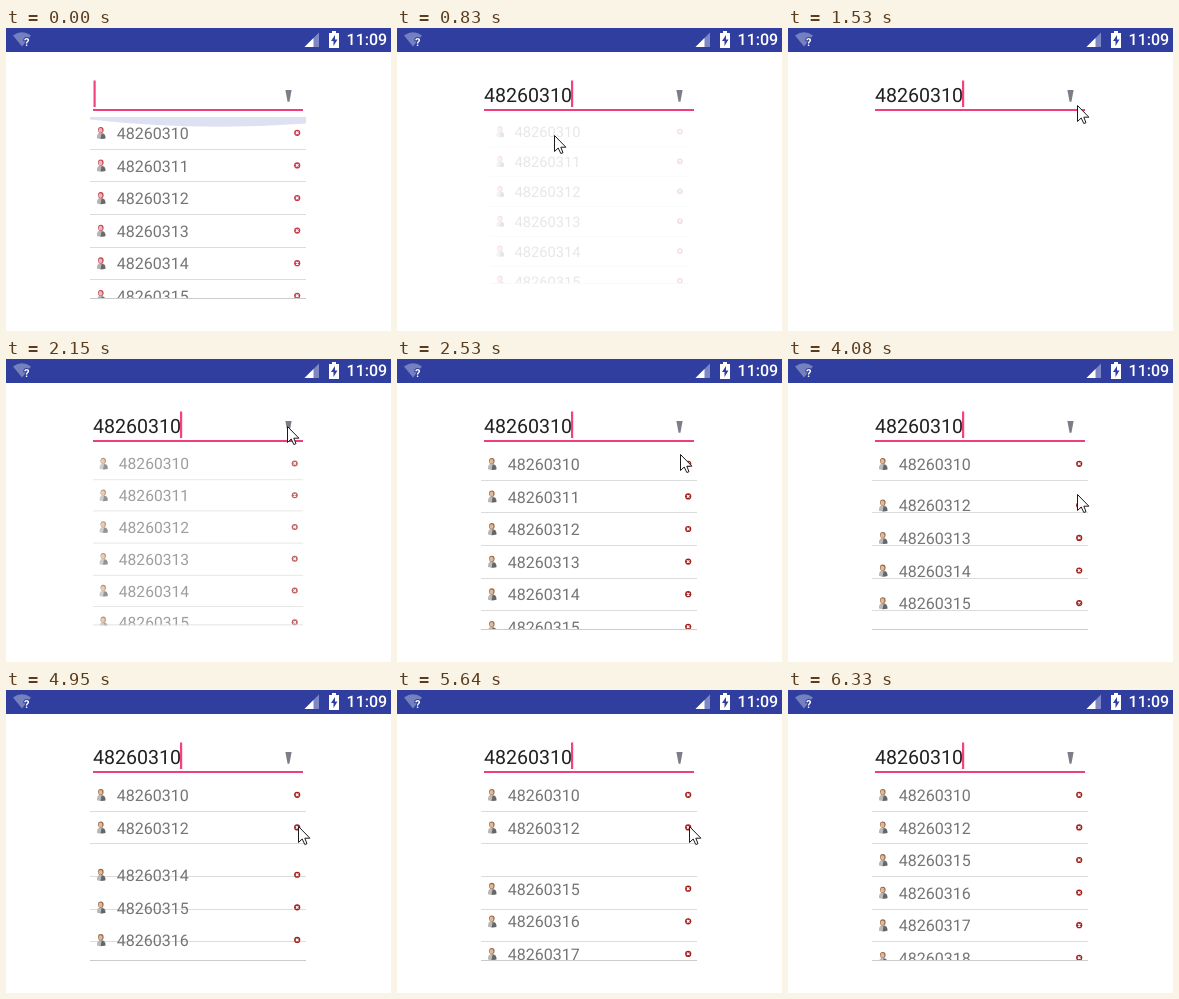
An HTML page for the animation above (6960 ms loop, 385 by 303 pixels).

```html
<!DOCTYPE html>
<html lang="en">
<head>
<meta charset="utf-8">
<title>Account dropdown</title>
<style>
  html, body { margin: 0; width: 100%; height: 100%; overflow: hidden; background: #fff; }
  svg { display: block; width: 385px; height: 303px; }
  text { font-family: Roboto, "Noto Sans", sans-serif; text-rendering: geometricPrecision; }
  #popup { --head: #e3b892; --hair: #93684a; --body: #b9b9b9; --shade: #666; --remove: #a3201c; }
  #popup.rosy { --head: #ecb4b9; --hair: #c2404e; --body: #b4b4b4; --shade: #696969; --remove: #c73a4c; }
  .row text { font-size: 16px; fill: #757575; }
</style>
</head>
<body>
<svg viewBox="0 0 385 303">
  <defs>
    <g id="person">
      <path d="M91 110.3Q90.6 106 93.6 104.8H96.6Q99.8 106 99.4 110.3Q95.5 111.6 91 110.3Z" fill="var(--body)"/>
      <path d="M95.6 105.4L98.4 106.4Q99.6 108 99.4 110.4L94.6 111Z" fill="var(--shade)"/>
      <ellipse cx="94.8" cy="102" rx="2.8" ry="3.1" fill="var(--hair)"/>
      <ellipse cx="94.5" cy="102.4" rx="2" ry="2.4" fill="var(--head)"/>
    </g>
    <g id="remove">
      <circle cx="291.2" cy="104.8" r="3.1" fill="var(--remove)"/>
      <path d="M289.9 103.5l2.6 2.6m0-2.6l-2.6 2.6" stroke="#fff" stroke-width="1.2"/>
    </g>
    <clipPath id="listClip"><rect x="84" y="89" width="216" height="182"/></clipPath>
  </defs>

  <rect width="385" height="303" fill="#fff"/>
  <rect width="385" height="24" fill="#303f9f"/>
  <g id="status">
    <path d="M7 7.5Q16 .8 25 7.5L16 18.5Z" fill="#7580bf"/>
    <text x="18" y="17.5" font-size="11" font-weight="700" fill="#fff" stroke="#303f9f" stroke-width="2" paint-order="stroke">?</text>
    <path d="M298.5 19L313 4.5V19Z" fill="#7d87c3"/>
    <path d="M298.5 19L307.5 10V19Z" fill="#fff"/>
    <path d="M326 3h4v2h3v15h-10V5h3Z" fill="#fff"/>
    <path d="M329 7l-4 6h2.5v5l4-6.5h-2.5Z" fill="#303f9f"/>
    <text x="340.6" y="17.3" font-size="16" font-weight="500" fill="#fff">11:09</text>
  </g>

  <text id="field" x="87" y="74" font-size="19.6" fill="#212121"></text>
  <rect id="caret" y="52.5" width="2.2" height="26.5" fill="#f0437f"/>
  <rect x="87" y="81" width="210" height="2" fill="#ee3f7c"/>
  <path d="M279.4 62H285.6L283.4 73.8H281.6Z" fill="#7d7d87"/>

  <g id="popup">
    <g clip-path="url(#listClip)">
      <g id="dividers" fill="#dcdcdc"></g>
      <g id="rows"></g>
      <path id="glow" d="M84 89H300V95.5Q192 103.5 84 91.5Z" fill="#dde1f2" style="mix-blend-mode:multiply"/>
      <rect x="84" y="270" width="216" height="1" fill="#cbcbcb"/>
    </g>
  </g>

  <path id="pointer" d="M.5 .5V16.5L4.2 13L6.8 18.5L9 17.7L6.8 12.2H11.9Z" fill="#fff" stroke="#1b1b1f"/>
</svg>
<script>
const LOOP = 6960, PITCH = 32.6, FIRST_ACCOUNT = 48260310, ROWS = 7;
const NS = "http://www.w3.org/2000/svg";
const el = id => document.getElementById(id);

// start, end, number of steps, path of the pointer tip
const moves = [
  [70, 590, 8, [[308, 257], [157, 107]]],
  [1370, 1830, 7, [[157, 107], [311, 72], [281, 67]]],
  [2460, 2780, 5, [[281, 67], [285, 138]]],
  [3010, 3010, 1, [[285, 138], [287, 137]]],
  [3240, 3240, 1, [[287, 137], [288, 135]]],
  [3620, 3700, 2, [[288, 135], [289, 135]]],
  [4400, 4400, 1, [[289, 135], [292, 136]]],
  [6100, 6330, 4, [[292, 136], [407, 310]]]
];

// id: removed account, gap: list position that closes up
const removals = [
  { id: 1, gap: 1, start: 3850, end: 4250, steps: 6, slide: 3895 },
  { id: 3, gap: 2, start: 4720, end: 5100, steps: 6, slide: 4789 },
  { id: 4, gap: 2, start: 5560, end: 5870, steps: 5, slide: 5570 }
];

const clamp = v => Math.min(1, Math.max(0, v));

function stepIndex(t, start, end, steps) {
  if (steps === 1) return 0;
  const gap = (end - start) / (steps - 1);
  return Math.min(steps - 1, Math.floor((t - start) / gap + 0.15));
}

function along(path, p) {
  const at = p * (path.length - 1);
  const i = Math.min(path.length - 2, Math.floor(at));
  return path[i].map((v, axis) => v + (path[i + 1][axis] - v) * (at - i));
}

function popupState(t) {
  if (t < 830) return [1, 1];
  if (t < 910) return [0.916, 0.17];
  if (t < 2150) return [1, 0];
  if (t < 2230) return [0.975, 0.7];
  if (t < 2310) return [0.992, 0.92];
  return [1, 1];
}

for (let i = 1; i < 6; i++) {
  const line = document.createElementNS(NS, "rect");
  const box = { x: 84, y: Math.floor(88.6 + i * PITCH), width: 216, height: 1 };
  for (const key in box) line.setAttribute(key, box[key]);
  el("dividers").append(line);
}

const rows = Array.from({ length: ROWS }, () => {
  const row = document.createElementNS(NS, "g");
  row.setAttribute("class", "row");
  row.innerHTML = '<use href="#person"/><text x="110.8" y="111"></text><use href="#remove"/>';
  el("rows").append(row);
  return row;
});

function drawList(t) {
  const done = removals.filter(r => t >= r.start);
  const gone = done.map(r => r.id);
  const last = done[done.length - 1];
  let shift = 0;
  if (last) {
    const k = stepIndex(t, last.start, last.end, last.steps);
    const now = last.start + k * (last.end - last.start) / (last.steps - 1);
    shift = PITCH * (1 + Math.cos(Math.PI * clamp((now - last.slide) / 300))) / 2;
  }
  let id = 0;
  rows.forEach((row, i) => {
    while (gone.includes(id)) id++;
    const y = i * PITCH + (last && i >= last.gap ? shift : 0);
    row.setAttribute("transform", `translate(0 ${y})`);
    row.children[1].textContent = FIRST_ACCOUNT + id++;
  });
}

function drawPointer(t) {
  const move = moves.filter(m => t >= m[0]).pop();
  el("pointer").style.display = move ? "" : "none";
  if (!move) return;
  const [start, end, steps, path] = move;
  const [x, y] = along(path, (stepIndex(t, start, end, steps) + 1) / steps);
  el("pointer").setAttribute("transform", `translate(${Math.round(x)} ${Math.round(y)})`);
}

function render(t) {
  const filled = t >= 830;
  el("field").textContent = filled ? FIRST_ACCOUNT : "";
  el("caret").setAttribute("x", filled ? 174 : 87.5);

  const [scale, alpha] = popupState(t);
  const popup = el("popup");
  popup.setAttribute("transform", `translate(192 90) scale(${scale}) translate(-192 -90)`);
  popup.setAttribute("opacity", alpha);
  popup.setAttribute("class", t < 910 ? "rosy" : "");
  const fade = t < 70 ? 0 : (stepIndex(t, 70, 590, 8) + 1) / 8;
  el("glow").setAttribute("opacity", 1 - clamp(fade));

  drawList(t);
  drawPointer(t);
}

const begin = performance.now();
function tick() {
  render((performance.now() - begin) % LOOP);
  requestAnimationFrame(tick);
}
tick();
</script>
</body>
</html>
```
